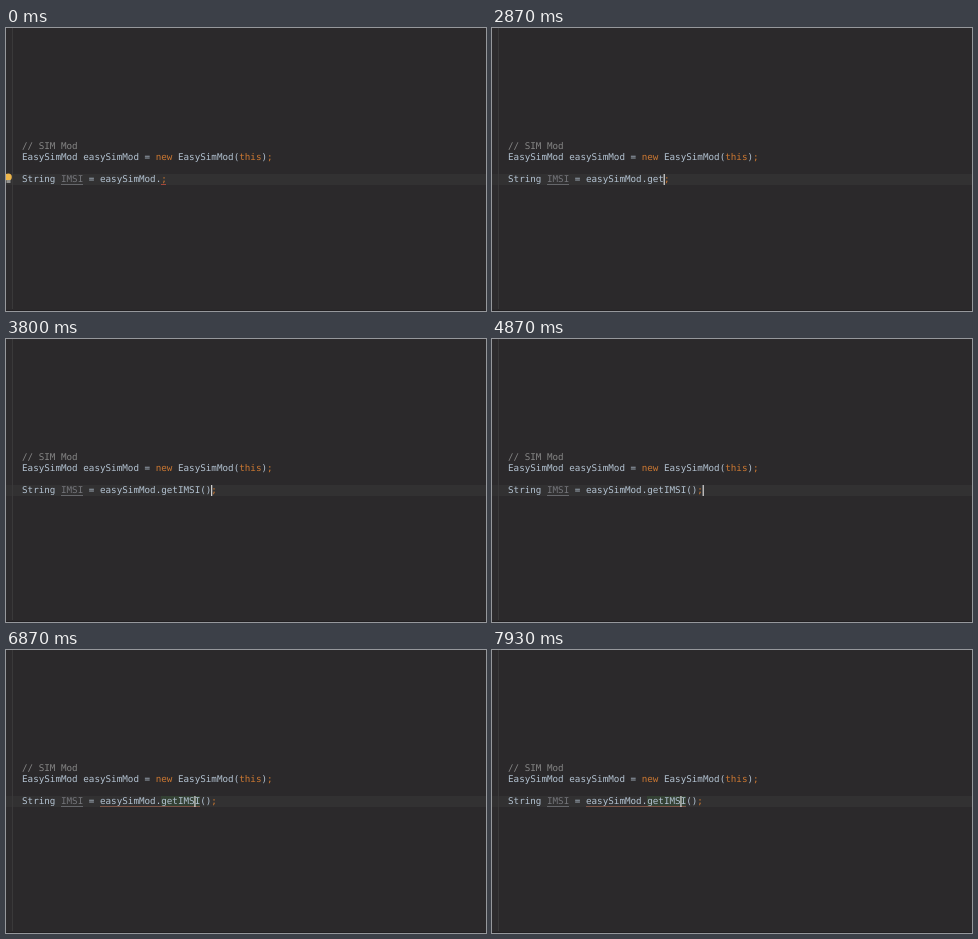
An HTML page that plays this animation: 480 px wide and 283 px high, repeating every 8 s.

```html
<!DOCTYPE html>
<html lang="en">
<head>
<meta charset="utf-8">
<title>Code completion</title>
<style>
  html, body { margin: 0; width: 100%; height: 100%; overflow: hidden; background: #2b292b; }
  svg { display: block; width: 480px; height: 283px; }
  text { font: 9.25px "DejaVu Sans Mono", monospace; fill: #b3c2d1; white-space: pre; text-rendering: geometricPrecision; }
  .key { fill: #cc7832; }
  .comment { fill: #858585; }
  .unused { fill: #75767b; }
  .popup text { fill: #b4b6b8; }
  .popup .match { fill: #b17cc4; }
  .popup .own { font-weight: bold; }
  .popup .icon { font: 7px "DejaVu Sans", sans-serif; fill: #3b3030; }
</style>
</head>
<body>
<svg viewBox="0 0 480 283">
  <rect width="480" height="283" fill="#2b292b"/>
  <rect width="6" height="281" fill="#2d2b2d"/>
  <rect y="146" width="480" height="11" fill="#323132"/>
  <rect x="6" width="1" height="281" fill="#3a393a"/>
  <rect y="282" width="480" height="1" fill="#222022"/>
  <rect id="usage" x="155" y="146" width="39" height="11" fill="#344134"/>
  <g id="bulb">
    <circle cx="2.3" cy="149" r="3.5" fill="#edb64c"/>
    <rect x="0.5" y="152" width="4" height="3" fill="#92918c"/>
  </g>
  <text x="16" y="121" class="comment">// SIM Mod</text>
  <text x="16" y="132">EasySimMod easySimMod = <tspan class="key">new</tspan> EasySimMod(<tspan class="key">this</tspan>)<tspan class="key">;</tspan></text>
  <text x="16" y="154">String <tspan class="unused">IMSI</tspan> = easySimMod.<tspan id="call"></tspan><tspan class="key">;</tspan></text>
  <path d="M55 156.5H77" stroke="#65666a"/>
  <path id="syntax" d="M155 156.5H160" stroke="#a4473b"/>
  <path id="warning" d="M94 156.5H194" stroke="#7c5548"/>
  <rect id="caret" y="146" width="1.2" height="11" fill="#d6d6d6"/>
  <g id="popup" class="popup">
    <rect x="133" y="157" width="302" height="87" fill="#45494b"/>
    <rect x="133" y="157" width="302" height="12" fill="#56585a"/>
    <rect x="133.5" y="157.5" width="301" height="86" fill="none" stroke="#545759"/>
  </g>
</svg>
<script>
const LOOP = 8000, CHAR = 5.569, LEFT = 16;
const get = id => document.getElementById(id);
const show = (id, on) => get(id).setAttribute("visibility", on ? "visible" : "hidden");

const methods = [
  ["IMSI", "String"], ["Carrier", "String"], ["Country", "String"], ["SIMSerial", "String"],
  ["ActiveMultiSimInfo", "List<SubscriptionInfo>"], ["NumberOfActiveSim", "int"],
  ["Class", "Class<? extends EasySimMod>"]
];
const escapeText = s => s.replace(/</g, "&lt;").replace(/>/g, "&gt;");
get("popup").innerHTML += methods.map(([name, type], i) => {
  const y = 166 + i * 12.35, own = name !== "Class";
  return `<circle cx="139" cy="${y - 3.2}" r="4.6" fill="${own ? "#bd817b" : "#a57872"}"/>
    <text class="icon" x="139" y="${y - 0.8}" text-anchor="middle">m</text>
    <path d="M147.5 ${y - 2.5}v-1.5q1-1.5 2 0v1.5" fill="none" stroke="#809c8a" stroke-width=".8"/>
    <rect x="148" y="${y - 2.5}" width="3.5" height="3" fill="#758f64"/>
    <text x="155" y="${y}" class="${own ? "own" : ""}"><tspan class="match">get</tspan>${name}<tspan font-weight="normal">()</tspan></text>
    <text x="430.5" y="${y}" text-anchor="end">${escapeText(type)}</text>`;
}).join("") + `<rect x="427.5" y="235" width="7" height="8" fill="#45494b"/>
  <text x="428" y="242" style="font-size:8px;fill:#6f9fc2">π</text>`;

// start time, typed call, caret column
const steps = [
  [-600, "", 26], [1870, "", 25], [2270, "g", 26], [2430, "ge", 27], [2600, "get", 28],
  [3800, "getIMSI()", 34], [4400, "getIMSI()", 35], [5600, "getIMSI()", 31]
];

function draw(now) {
  const t = now % LOOP;
  const [start, call, column] = steps.filter(s => s[0] <= t).pop();
  get("call").textContent = call;
  get("caret").setAttribute("x", LEFT + column * CHAR - 0.3);
  show("caret", (t - start) % 1000 < 500);
  show("bulb", t < 1000);
  show("syntax", t < 2270);
  show("popup", t >= 3000 && t < 3800);
  show("usage", t >= 5600);
  show("warning", t >= 5600);
  requestAnimationFrame(() => draw(performance.now()));
}
draw(0);
</script>
</body>
</html>
```
